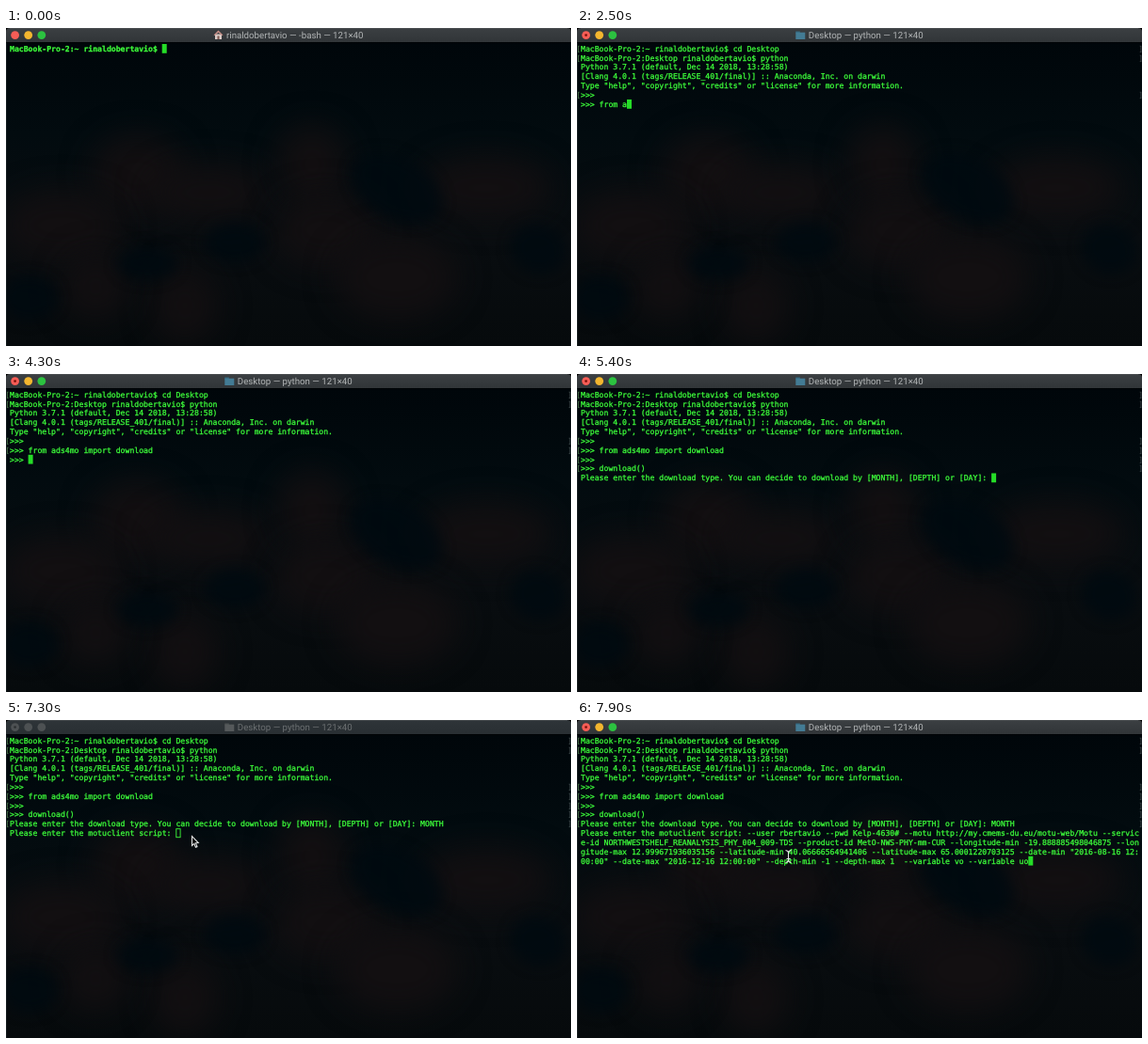
An HTML page with a canvas that plays this animation: 600 by 338 pixels, repeating every 8000 ms.

```html
<!DOCTYPE html>
<html lang="en">
<head>
<meta charset="utf-8">
<title>Terminal session</title>
<style>
html, body { margin: 0; width: 100%; height: 100%; overflow: hidden; background: #000; }
canvas { display: block; }
</style>
</head>
<body>
<canvas id="stage" width="600" height="338"></canvas>
<script>
const W = 600, H = 338, LOOP = 8000, TICK = 100;
const LEFT = 4, TOP = 17, COL = 4.9, ROW = 9.83, COLS = 121;
const GREEN = '#3cfa3a', MONO = '8.14px "DejaVu Sans Mono", monospace';
const USER = 'rinaldobertavio', HOST = 'MacBook-Pro-2';

// Each input: prompt, typed text, typing start and end, Enter time, output
const session = [
  { prompt: `${HOST}:~ ${USER}$ `, text: 'cd Desktop', from: 0, to: 750, enter: 900 },
  { prompt: `${HOST}:Desktop ${USER}$ `, text: 'python', from: 1050, to: 1700, enter: 1900, out: [
    'Python 3.7.1 (default, Dec 14 2018, 13:28:58)',
    '[Clang 4.0.1 (tags/RELEASE_401/final)] :: Anaconda, Inc. on darwin',
    'Type "help", "copyright", "credits" or "license" for more information.'] },
  { prompt: '>>> ', text: '', from: 1900, to: 1950, enter: 2000 },
  { prompt: '>>> ', text: 'from ads4mo import download', from: 2100, to: 3800, enter: 3900 },
  { prompt: '>>> ', text: '', from: 3900, to: 4300, enter: 4400 },
  { prompt: '>>> ', text: 'download()', from: 4500, to: 5200, enter: 5300 },
  { prompt: 'Please enter the download type. You can decide to download by [MONTH], [DEPTH] or [DAY]: ',
    text: 'MONTH', from: 5500, to: 6000, enter: 6200 },
  { prompt: 'Please enter the motuclient script: ', from: 7699, to: 7700, enter: Infinity,
    text: '--user rbertavio --pwd Kelp-4630# --motu http://my.cmems-du.eu/motu-web/Motu ' +
      '--service-id NORTHWESTSHELF_REANALYSIS_PHY_004_009-TDS --product-id MetO-NWS-PHY-mm-CUR ' +
      '--longitude-min -19.888885498046875 --longitude-max 12.999671936035156 ' +
      '--latitude-min 40.06666564941406 --latitude-max 65.0001220703125 ' +
      '--date-min "2016-08-16 12:00:00" --date-max "2016-12-16 12:00:00" ' +
      '--depth-min -1 --depth-max 1  --variable vo --variable uo' }
];
// Pointer path: time, x, y
const path = [[7300, 197, 123], [7500, 214, 205], [7600, 219, 205], [7900, 224.5, 145]];

const c = document.getElementById('stage').getContext('2d');
const clamp = v => Math.max(0, Math.min(1, v));

function rect(g, color, x, y, w, h) {
  g.fillStyle = color;
  g.fillRect(x, y, w, h);
}

function disc(g, color, x, y, rx, ry = rx, turn = 0) {
  g.fillStyle = color;
  g.beginPath();
  g.ellipse(x, y, rx, ry, turn, 0, 7);
  g.fill();
}

function shape(color, points) {
  c.fillStyle = color;
  c.beginPath();
  for (const [x, y] of points) c.lineTo(x, y);
  c.closePath();
  c.fill();
}

// Dim wallpaper seen through the translucent window
function makeWallpaper() {
  const canvas = document.createElement('canvas');
  canvas.width = W;
  canvas.height = H;
  const g = canvas.getContext('2d');
  const sky = g.createLinearGradient(0, 15, 0, H);
  sky.addColorStop(0, '#00060a');
  sky.addColorStop(0.3, '#020b0f');
  sky.addColorStop(0.65, '#090d10');
  sky.addColorStop(1, '#060a0c');
  rect(g, sky, 0, 0, W, H);
  g.filter = 'blur(16px)';
  const warm = [[140, 155, 50, 42], [60, 210, 65, 38], [215, 175, 65, 30], [325, 145, 38, 42],
    [510, 170, 70, 34], [340, 215, 55, 40], [415, 265, 65, 45], [190, 295, 35, 40], [95, 275, 35, 35]];
  for (const b of warm) disc(g, '#120f11', ...b);
  g.filter = 'blur(7px)';
  const cool = [[415, 170, 52, 32, 0.5], [243, 228, 32, 21], [150, 250, 32, 18],
    [25, 287, 30, 24], [565, 235, 30, 26, 0.3]];
  for (const b of cool) disc(g, '#010b10d0', ...b);
  return canvas;
}
const wallpaper = makeWallpaper();

function drawIcon(kind, x, active) {
  if (kind === 'home') {
    rect(c, '#d9c9c4', x + 1.5, 6.5, 7, 5.5);
    shape('#c98f88', [[x, 7.5], [x + 5, 2.5], [x + 10, 7.5], [x + 8.8, 8], [x + 5, 4.7], [x + 1.2, 8]]);
    rect(c, '#7d5750', x + 4, 8.5, 2, 3.5);
  } else if (kind === 'desktop') {
    rect(c, '#9cc4d6', x, 3.5, 10.5, 8.5);
    rect(c, '#2d7193', x + 1, 5, 8.5, 6);
    shape('#8bc36a', [[x + 1, 11], [x + 4, 7], [x + 6, 9], [x + 7.5, 7.5], [x + 9.5, 11]]);
  } else {
    rect(c, active ? '#33687f' : '#4a4e50', x, 3.5, 4.5, 2);
    rect(c, active ? '#437b94' : '#55595b', x, 4.7, 10, 7.3);
  }
}

function drawTitleBar(t, active) {
  const bar = c.createLinearGradient(0, 0, 0, 15);
  bar.addColorStop(0, active ? '#3b3f42' : '#2e3438');
  bar.addColorStop(1, active ? '#313538' : '#292f33');
  rect(c, '#000', 0, 0, W, 15.5);
  c.fillStyle = bar;
  c.beginPath();
  c.roundRect(0, 0, W, 15, [4, 4, 0, 0]);
  c.fill();
  rect(c, '#565a5c', 4, 0, W - 8, 0.5);

  ['#f75d56', '#f3b62f', '#2cc240'].forEach((color, i) =>
    disc(c, active ? color : '#4d5153', 9.6 + 14.1 * i, 7.6, 4.4));
  if (t >= 1800) disc(c, active ? '#7d120c' : '#2c3032', 9.6, 7.6, 1.4);

  const [kind, name] = t < 900 ? ['home', `${USER} — -bash`]
    : t < 1800 ? ['desktop', 'Desktop — -bash'] : ['folder', 'Desktop — python'];
  const title = `${name} — 121×40`;
  c.font = '9.7px Roboto, sans-serif';
  const x = W / 2 - (c.measureText(title).width + 13.5) / 2;
  drawIcon(kind, x, active);
  c.fillStyle = active ? '#b2b5b6' : '#6c7072';
  c.fillText(title, x + 13.5, 11.2);
}

function drawRow(text, row) {
  const y = TOP + 7.8 + row * ROW;
  c.fillStyle = c.strokeStyle = GREEN;
  c.lineWidth = 0.3;
  [...text].forEach((ch, i) => {
    if (ch === ' ') return;
    c.fillText(ch, LEFT + i * COL, y);
    c.strokeText(ch, LEFT + i * COL, y);
  });
}

function drawMarks(row) {
  const y = TOP + 7.8 + row * ROW;
  c.fillStyle = '#4f7f50';
  c.fillText('[', -0.8, y);
  c.fillStyle = '#475355';
  c.fillText(']', 596.3, y);
}

function drawCaret(col, row, active) {
  const x = LEFT + col * COL, y = TOP + row * ROW;
  if (active) return rect(c, '#25dd27', x, y, 5, 9.8);
  c.strokeStyle = GREEN;
  c.lineWidth = 0.9;
  c.strokeRect(x + 0.4, y + 0.4, 4.3, 9);
}

function drawSession(t, active) {
  c.font = (t < 800 ? 'bold ' : '') + MONO;
  let row = 0;
  for (const s of session) {
    const typed = Math.floor(s.text.length * clamp((t - s.from) / (s.to - s.from)));
    const line = s.prompt + s.text.slice(0, typed);
    if (t >= s.enter) drawMarks(row);
    for (let i = 0; i < line.length; i += COLS) drawRow(line.slice(i, i + COLS), row++);
    if (t < s.enter) {
      drawCaret(line.length % COLS, row - 1, active);
      break;
    }
    for (const text of s.out || []) drawRow(text, row++);
  }
}

function drawPointer(t, active) {
  if (t < path[0][0]) return;
  const n = Math.max(1, path.findIndex(p => p[0] >= t));
  const [t0, x0, y0] = path[n - 1], [t1, x1, y1] = path[n];
  const k = clamp((t - t0) / (t1 - t0));
  c.save();
  c.translate(x0 + (x1 - x0) * k, y0 + (y1 - y0) * k);
  c.strokeStyle = '#e4e6e6';
  c.lineWidth = 1.1;
  c.beginPath();
  if (active) {
    c.moveTo(-3, -6.5);
    c.quadraticCurveTo(0, -6, 0, -4);
    c.lineTo(0, 4);
    c.quadraticCurveTo(0, 6, -3, 6.5);
    c.moveTo(3, -6.5);
    c.quadraticCurveTo(0, -6, 0, -4);
    c.moveTo(0, 4);
    c.quadraticCurveTo(0, 6, 3, 6.5);
    c.moveTo(-2, 2.5);
    c.lineTo(2, 2.5);
  } else {
    const arrow = [[0.5, 0.5], [0.5, 10.5], [2.8, 8.4], [4.4, 12.3], [6, 11.6], [4.4, 7.8], [7.3, 7.6]];
    for (const [x, y] of arrow) c.lineTo(x, y);
    c.closePath();
    c.fillStyle = '#050505';
    c.fill();
  }
  c.stroke();
  c.restore();
}

function draw() {
  const t = Math.floor(performance.now() % LOOP / TICK) * TICK;
  const active = t < 6600 || t >= 7600;
  c.textRendering = 'geometricPrecision';
  c.drawImage(wallpaper, 0, 0);
  rect(c, '#1d2629', 0, 15, 0.6, H);
  drawTitleBar(t, active);
  drawSession(t, active);
  drawPointer(t, active);
  requestAnimationFrame(draw);
}
draw();
</script>
</body>
</html>
```
